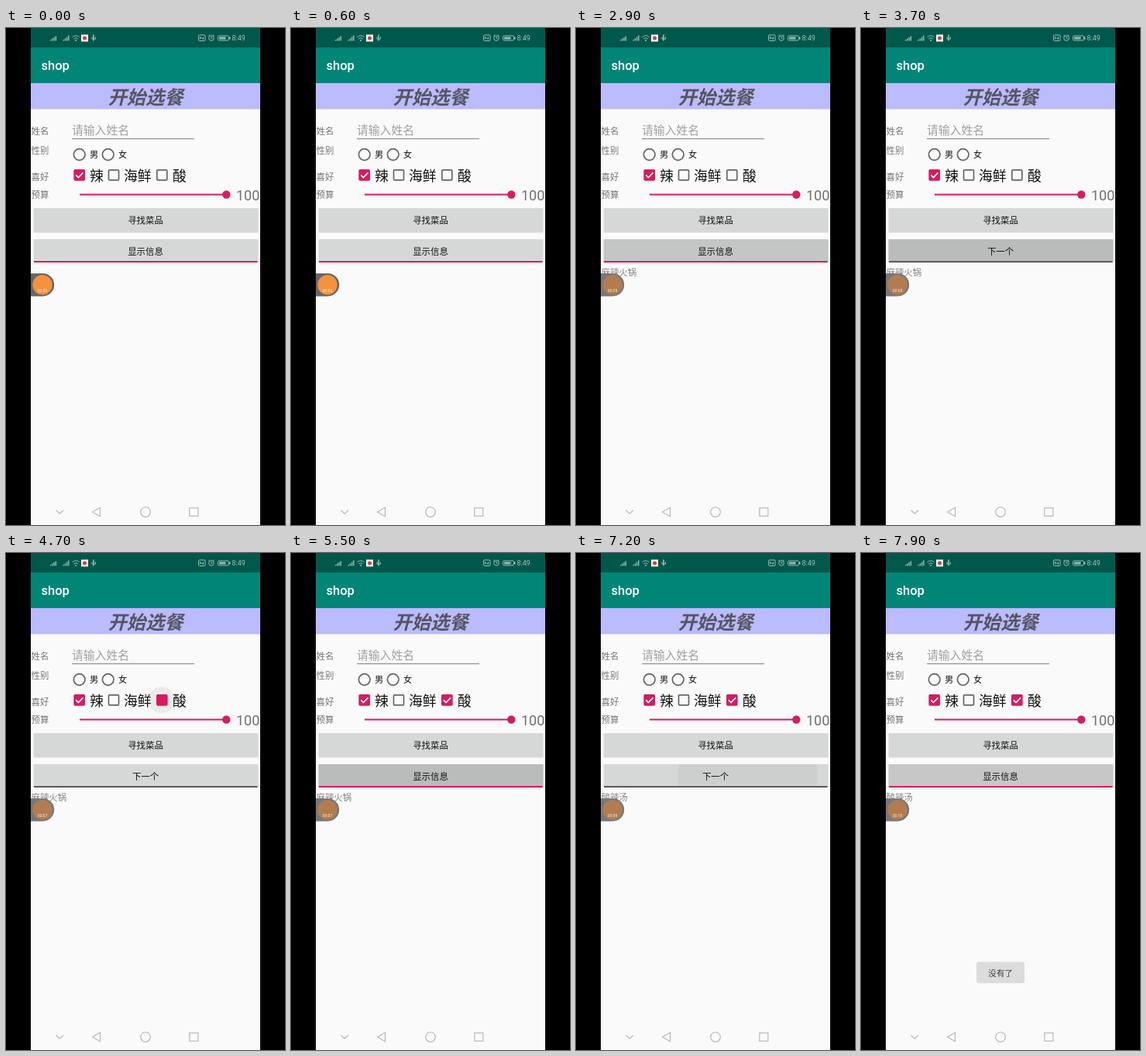
An HTML page for the animation above (8 s loop, 360 by 640 pixels).

```html
<!DOCTYPE html>
<html lang="zh-CN">
<head>
<meta charset="utf-8">
<title>shop</title>
<style>
  html, body { margin: 0; width: 100%; height: 100%; overflow: hidden; background: #000; }
  svg { display: block; width: 360px; height: 640px; }
  text { font-family: Roboto, "Noto Sans CJK SC", "Noto Sans CJK", sans-serif; }
</style>
</head>
<body>
<svg id="stage" viewBox="0 0 360 640" xmlns="http://www.w3.org/2000/svg">
  <defs>
    <clipPath id="findClip"><rect x="35.5" y="232" width="290" height="31.5" rx="1"/></clipPath>
    <clipPath id="nextClip"><rect x="35.5" y="272" width="290" height="30" rx="1"/></clipPath>
  </defs>
  <rect width="360" height="640"/>
  <rect x="32" width="296" height="640" fill="#fafafa"/>
  <rect x="32" width="296" height="25" fill="#00574b"/>
  <rect x="32" y="25" width="296" height="46" fill="#008577"/>
  <rect x="32" y="71" width="296" height="33.500" fill="#bbbbff"/>

  <!-- status bar -->
  <g fill="#99bbb6" stroke="none">
    <path d="M57 16.500V15h1.400v1.500zM59.200 16.500V13.500h1.400v3zM61.400 16.500V12h1.400v4.500zM63.600 16.500V10.500H65v6zM73.500 16.500V15h1.400v1.500zM75.700 16.500V13.500h1.400v3zM77.900 16.500V11.500h1.400v5zM80.100 16.500V9.500h1.400v7z"/>
    <circle cx="90" cy="16" r="1"/>
    <path d="M112.200 8.500h1.600v8h-1.600zM110.500 11.500h1v2h3.500v-2h1v3h-5.500z"/>
    <rect x="273.500" y="10" width="14" height="6" rx="1.500" fill="none" stroke="#99bbb6"/>
    <rect x="275" y="11.500" width="8.500" height="3"/>
    <rect x="288" y="11.500" width="1.500" height="3"/>
  </g>
  <g fill="none" stroke="#99bbb6">
    <path d="M85.500 11.800q4.500-4 9 0M87.300 14q2.700-2.400 5.400 0"/>
    <rect x="248.500" y="9" width="8.500" height="7.500" rx="1"/>
    <path d="M250.500 14.500v-3l4 3v-3"/>
    <circle cx="265" cy="13" r="3.300"/>
    <path d="M265 11v2.200h1.600M261.300 10.300l1.800-1.600M268.700 10.300l-1.800-1.600"/>
  </g>
  <rect x="97" y="8.500" width="9" height="9" fill="#f6f6f6"/>
  <circle cx="101.500" cy="13" r="2.500" fill="#dc3c34"/>

  <g id="form"></g>

  <!-- name field -->
  <path d="M85 142.700H243" stroke="#929292" stroke-width="1.200"/>

  <!-- budget slider -->
  <path d="M95 214.500H284" stroke="#d81b60" stroke-width="1.900"/>
  <circle cx="284.300" cy="214.500" r="5.200" fill="#d81b60"/>

  <!-- buttons -->
  <rect x="35.500" y="232" width="290" height="31.500" rx="1" fill="#d6d7d7"/>
  <g clip-path="url(#findClip)"><circle id="findInk" cy="247.500" fill="#a8a8a8"/></g>
  <rect x="35.500" y="272" width="290" height="30" rx="1" fill="#d6d7d7"/>
  <g clip-path="url(#nextClip)"><circle id="nextInk" cy="287" fill="#a8a8a8"/></g>
  <path id="bar" d="M36 301H324.500" stroke-width="1.800"/>
  <g id="labels"></g>

  <!-- floating recorder bubble -->
  <path id="tab" d="M32 316H47.500a14.700 14.700 0 0 1 0 29.400H32z"/>
  <circle id="disc" cx="47" cy="330.700" r="12.700"/>
  <text id="timer" x="47" y="340" font-size="5" text-anchor="middle" fill="#fff0e0"></text>

  <g id="toast">
    <rect x="149" y="526.500" width="62" height="27.500" rx="3" fill="#dcdcdc"/>
  </g>

  <!-- navigation bar -->
  <g fill="none" stroke="#b8b8b8" stroke-width="1.200">
    <path d="M64.500 621l4.700 4.500 4.700-4.500M121.500 617.500v11.500l-10-5.750z"/>
    <circle cx="180" cy="623.300" r="6.300"/>
    <rect x="236.800" y="618" width="11" height="10.500"/>
  </g>
  <rect x="328" width="32" height="640"/>
</svg>
<script>
const LOOP = 8000;
const NS = "http://www.w3.org/2000/svg";
const ACCENT = "#d81b60";
const $ = id => document.getElementById(id);
const clamp = v => Math.max(0, Math.min(1, v));

function add(parent, tag, attrs, content = "") {
  const el = document.createElementNS(NS, tag);
  for (const k in attrs) el.setAttribute(k, attrs[k]);
  el.textContent = content;
  parent.append(el);
  return el;
}
function set(el, attrs) {
  for (const k in attrs) el.setAttribute(k, attrs[k]);
}
// cy is the optical middle of the line
function label(parent, str, x, cy, size, fill, extra = {}) {
  return add(parent, "text", { x, y: cy + size * 0.37, "font-size": size, fill, ...extra }, str);
}

const form = $("form"), labels = $("labels");
const mid = { "text-anchor": "middle" };

label(form, "8:49", 291.5, 13, 9, "#a3c2be");
label(form, "shop", 45.5, 48, 16.5, "#fff", { "font-weight": 500 });
label(form, "开始选餐", 180, 89.5, 24.3, "#555560", { ...mid, "font-weight": 700, "font-style": "italic" });
[["姓名", 133], ["性别", 158], ["喜好", 192], ["预算", 215]].forEach(([s, y]) =>
  label(form, s, 32.5, y, 11.4, "#757575"));
label(form, "请输入姓名", 85, 132, 14.8, "#a0a0a0");
label(form, "100", 297, 215.3, 18, "#707070");

[[94.7, "男", 108], [131.7, "女", 145]].forEach(([cx, s, x]) => {
  add(form, "circle", { cx, cy: 163, r: 7.3, fill: "none", stroke: "#666", "stroke-width": 1.7 });
  label(form, s, x, 163.3, 11.2, "#111");
});

const halo = add(form, "circle", { cx: 201, cy: 189.3, fill: "#ebebeb" });
function checkbox(cx, str, x) {
  const box = add(form, "rect", {
    x: cx - 6.5, y: 182.8, width: 13, height: 13, rx: 1, "stroke-width": 1.7
  });
  const tick = add(form, "path", {
    d: `M${cx - 4.5} 189.300l3.200 3.200 6-6.200`, fill: "none", stroke: "#fff", "stroke-width": 1.7
  });
  label(form, str, x, 190.3, 17.8, "#111");
  return (fill, mark) => {
    set(box, { fill: fill ? ACCENT : "none", stroke: fill ? ACCENT : "#666" });
    set(tick, { "stroke-dasharray": "14", "stroke-dashoffset": 14 * (1 - mark), opacity: mark > 0 ? 1 : 0 });
  };
}
checkbox(94.7, "辣", 108)(true, 1);
checkbox(139, "海鲜", 152)(false, 0);
const sour = checkbox(201.3, "酸", 215);

label(labels, "寻找菜品", 180, 247.5, 11.4, "#111", { ...mid, "font-weight": 500 });
const action = label(labels, "", 180, 287.7, 11.4, "#111", { ...mid, "font-weight": 500 });
const dish = label(labels, "", 32.5, 315, 11.4, "#858585");
label($("toast"), "没有了", 180, 540.7, 10.7, "#3c3c3c", mid);

// taps: start, fade start, fade end
const findTaps = [[70, 350, 600], [4880, 5080, 5280]];
const nextTaps = [
  [1180, 1480, 1680], [1690, 1930, 2080], [2090, 2350, 2540], [2550, 2800, 3080],
  [3380, 3720, 4000], [5280, 5600, 5820], [5830, 6110, 6200],
  [6380, 6620, 6770], [6780, 7040, 7170], [7176, 7400, 7540], [7550, 7820, 8000]
];
const SHOW = "显示信息", NEXT = "下一个";

// stepped values: [time, value]
const actions = [[0, SHOW], [1285, NEXT], [1795, SHOW], [2195, NEXT], [2655, SHOW],
  [3485, NEXT], [5385, SHOW], [5935, NEXT], [6485, SHOW], [6885, NEXT], [7290, SHOW]];
const dishes = [[0, ""], [1285, "水煮鱼"], [2195, "麻辣火锅"], [5935, "西芹炒百合"], [6885, "酸辣汤"]];
const seconds = [[0, 2], [500, 3], [1600, 4], [2600, 5], [4600, 7], [6600, 9], [7600, 10]];

function at(steps, t) {
  let value;
  for (const [start, v] of steps) if (t >= start) value = v;
  return value;
}

// standard curve (0.4, 0, 0.2, 1) solved by bisection
function ease(x) {
  let lo = 0, hi = 1, s = 0;
  for (let i = 0; i < 16; i++) {
    s = (lo + hi) / 2;
    const bx = 1.2 * s * (1 - s) ** 2 + 0.6 * s * s * (1 - s) + s ** 3;
    if (bx < x) lo = s; else hi = s;
  }
  return 3 * s * s * (1 - s) + s ** 3;
}

function ink(el, taps, t) {
  const tap = taps.find(([start, , end]) => t >= start && t < end);
  if (!tap) return set(el, { r: 0, opacity: 0 });
  const [start, fade, end] = tap;
  const p = ease(clamp((t - start) / 225));
  const alpha = clamp((t - start) / 75) * (1 - clamp((t - fade) / (end - fade)));
  set(el, { cx: 223 - 43 * p, r: 88 + 60 * p, opacity: 0.6 * alpha });
}

function draw(t) {
  ink($("findInk"), findTaps, t);
  ink($("nextInk"), nextTaps, t);

  const text = at(actions, t);
  action.textContent = text;
  set($("bar"), { stroke: text === SHOW ? ACCENT : "#5a5a5a" });
  dish.textContent = at(dishes, t);

  const grow = ease(clamp((t - 4380) / 200));
  set(halo, { r: 17 * grow, opacity: clamp((t - 4380) / 80) * (1 - clamp((t - 4720) / 160)) });
  sour(t >= 4580, clamp((t - 4710) / 140));

  const dim = t >= 2600;
  set($("tab"), { fill: dim ? "#78787a" : "#66666a" });
  set($("disc"), { fill: dim ? "#b27c50" : "#f5923e" });
  $("timer").textContent = "00:" + String(at(seconds, t)).padStart(2, "0");

  set($("toast"), { opacity: clamp((t - 7640) / 200) });
}

const begin = performance.now();
function frame() {
  draw((performance.now() - begin) % LOOP);
  requestAnimationFrame(frame);
}
frame();
</script>
</body>
</html>
```
